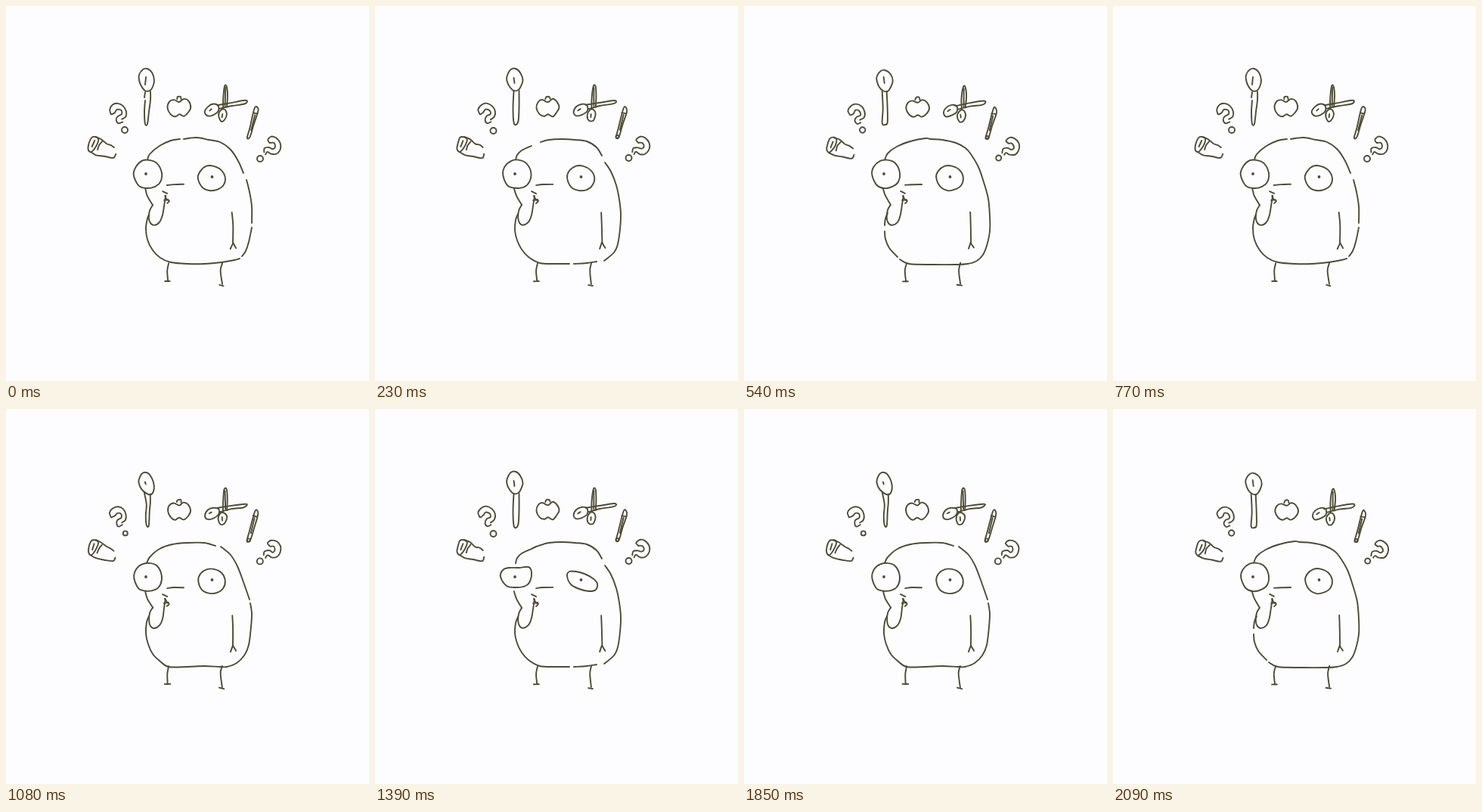
An HTML page with a canvas that plays this animation: 480x496 px, repeating every 2.17 s.

```html
<!DOCTYPE html>
<html lang="en">
<head>
<meta charset="utf-8">
<title>Thinking doodle</title>
<style>
html, body { margin: 0; width: 100%; height: 100%; overflow: hidden; background: #fdfdff; }
canvas { display: block; width: 480px; height: 496px; }
</style>
</head>
<body>
<canvas id="stage" width="480" height="496"></canvas>
<script>
const ctx = document.getElementById('stage').getContext('2d');
const PAPER = '#fdfdff', INK = '#4d4b33';
const LOOP = 2170, STEP = 77.2, LAST = 27;

// Strokes are split by "/"; a trailing "z" closes one.
const body = [
  `187,204 190,196 203,185 218,178 230,176 / 235,176 252,174 268,177 283,180 297,190 307,205 314,221
   / 318,230 322,246 325,265 325,287 / 325,293 321,312 317,324 312,331
   / 309,334 302,336 285,339 263,341 240,341 218,339 204,333 194,323 187,309 185,294 187,281 189,276`,
  `186,204 190,195 202,186 220,178 242,175 262,177 280,180 294,188 301,198 311,215 318,235 323,255 325,278
   324,298 321,316 315,328 306,337 294,340 270,341 240,341 218,340 204,333 193,321 187,308 185,295 187,281 190,274`,
  `186,204 190,195 202,186 220,179 240,175 247,176 262,177 280,181 293,188 300,196 310,213 317,233 323,255
   325,278 325,298 321,317 316,329 308,337 296,341 280,342 250,342 218,341 206,335
   / 203,332 192,320 187,308 186,298 / 186,290 187,281 190,274`,
  `186,204 188,197 194,191 207,185 / 219,180 230,177 247,176 264,177 280,179 293,187 300,198
   / 304,207 312,219 319,237 323,256 325,275 324,295 321,315 316,326 303,337 / 293,338 280,340 263,341
   / 257,341 240,341 218,340 203,332 194,322 188,310 185,297 186,283 189,275`,
  `186,204 190,196 203,185 220,179 240,177 262,177 277,181 / 284,182 297,193 306,208 314,229 322,252
   / 323,257 325,270 324,288 321,312 315,326 305,336 292,341 283,341 262,340 240,341 215,341 203,333 194,324
   188,311 185,297 186,282 189,274`
];

const spoon = [
  `176,91 181,84 187,83 193,88 196,98 194,107 190,112 184,112 179,106 176,98 z / 185,94 184,104
   / 184,114 183,121 / 184,125 183,140 184,156 187,156 189,140 191,124 191,113`,
  `175,92 180,85 187,84 193,89 196,99 193,108 189,112 183,112 178,106 175,98 z / 185,95 184,102
   / 183,113 183,140 184,155 187,157 189,145 190,113`,
  `175,92 180,85 186,84 193,89 196,98 193,107 189,112 183,111 178,106 175,98 z / 184,93 185,101
   / 182,112 183,135 182,154 186,156 189,153 189,135 188,112`,
  `175,93 180,84 187,83 193,89 196,98 193,107 190,111 184,112 178,106 175,99 z / 184,95 185,102
   / 184,112 183,135 184,154 187,157 190,152 191,135 191,112`,
  `176,93 180,85 187,84 193,91 196,101 195,109 191,113 184,110 179,105 176,98 z / 184,96 185,99
   / 183,110 186,126 185,140 186,153 189,154 190,135 191,124 191,112`
];

// Dots of the two question marks: x, y, radius per pose.
const dotA = [[157, 164, 4], [157, 164, 3.7], [156, 163, 3.7], [157, 165, 4], [158, 164, 3]];
const dotB = [[336, 202, 4], [336, 201, 4], [336, 200, 3.5], [336, 201, 4], [336, 201, 4]];

const shift = [[0, 0], [.3, .4], [.7, 1], [-.5, 0], [-.2, .4]];

const cup = `118,173 113,174 110,181 109,189 112,193 116,190 120,183 122,176 z
  / 119,173 126,176 133,182 139,184 143,187 / 112,193 119,197 130,199 142,201 145,196
  / 127,179 123,184 121,190 / 117,178 114,186`;
const apple = `229,127 222,124 216,127 214,135 218,143 224,146 229,143 235,146 241,141 244,134 241,126 235,123 z
  / 226,123 227,120 231,120 232,123`;
const scissors = `263,140 267,133 274,130 281,132 281,139 274,144 266,145 z / 269,138 272,136
  / 279,131 296,128 316,125 319,127 314,130 298,132 283,136
  / 287,136 287,122 289,106 292,106 293,118 292,134 / 290,108 290,132
  / 281,145 284,138 289,137 292,143 289,151 284,152 z / 286,143 286,147`;
const pencil = `329,135 333,135 333,141 328,157 323,173 319,174 322,161 z / 327,141 332,142 / 329,144 324,164`;
const hookA = `139,143 137,137 141,131 148,129 155,132 159,139 158,146 153,150
  / 154,153 149,155 146,151 148,146 153,143 152,138 147,137 144,141 140,143`;
const hookB = `349,181 346,177 351,173 358,175 363,181 363,189 358,195 351,196 346,193 343,196
  / 341,193 342,188 348,187 353,189 356,186 354,181 350,181`;

const face = `213,237 222,236 235,236 / 184,241 187,251 194,263
  / 194,263 190,270 189,280 191,287 196,290 203,286 207,277 209,263 211,251
  / 207,245 213,248 / 210,251 213,256 216,258 213,261 / 209,257 215,256`;
const limbs = `299,273 300,290 300,314 / 300,313 297,321 / 300,313 304,320
  / 215,340 213,350 214,364 / 210,364 217,364
  / 286,340 284,350 286,368 / 282,369 288,370`;

const wideL = `169,223 172,212 180,205 190,204 200,208 206,220 204,232 197,239 186,241 175,237 z`;
const wideR = `254,227 257,218 265,212 275,212 285,217 290,227 287,237 279,243 269,244 259,239 z`;
const squintL = `166,222 169,213 177,210 190,210 203,209 207,216 205,228 199,234 187,236 174,234 z`;
const squintR = `254,221 257,215 266,215 277,218 288,224 294,231 292,239 283,241 270,238 259,232 z`;

function noise(n) {
  const v = Math.sin(n * 127.1 + 3.7) * 43758.5453;
  return v - Math.floor(v) - .5;
}

// Smooth curve through the points.
function trace(pts, closed) {
  const n = pts.length;
  const at = i => closed ? pts[(i + n) % n] : pts[Math.max(0, Math.min(n - 1, i))];
  ctx.beginPath();
  ctx.moveTo(...pts[0]);
  for (let i = 0; i < (closed ? n : n - 1); i++) {
    const [a, b, c, d] = [at(i - 1), at(i), at(i + 1), at(i + 2)];
    ctx.bezierCurveTo(
      b[0] + (c[0] - a[0]) / 6, b[1] + (c[1] - a[1]) / 6,
      c[0] - (d[0] - b[0]) / 6, c[1] - (d[1] - b[1]) / 6, c[0], c[1]);
  }
  if (closed) ctx.closePath();
}

function sketch(text, pose, wobble = 0, fill = false) {
  text.split('/').forEach((part, s) => {
    const closed = part.includes('z');
    const pts = part.match(/\d+,\d+/g).map((p, i) => {
      const seed = pose * 97 + s * 31 + i * 2;
      return p.split(',').map((v, k) => +v + noise(seed + k) * wobble);
    });
    trace(pts, closed);
    if (fill) ctx.fill();
    ctx.stroke();
  });
}

function ring([x, y, r]) {
  ctx.beginPath();
  ctx.arc(x, y, r, 0, 7);
  ctx.stroke();
}

function pupil(x, y) {
  ctx.fillStyle = INK;
  ctx.beginPath();
  ctx.arc(x, y, 1.9, 0, 7);
  ctx.fill();
}

function draw(step) {
  const pose = step % 5;
  const squint = step >= 17 && step <= 19;
  ctx.fillStyle = PAPER;
  ctx.fillRect(0, 0, 480, 496);
  ctx.strokeStyle = INK;
  ctx.lineWidth = 1.9;
  ctx.lineCap = ctx.lineJoin = 'round';

  sketch(body[pose], pose);
  if (pose === 3 && step > 5) sketch('207,185 213,182 219,180', pose);
  sketch(face, pose, .6);
  sketch(limbs, pose, .9);

  ctx.fillStyle = PAPER;
  sketch(squint ? squintL : wideL, pose, squint ? 0 : .8, true);
  sketch(squint ? squintR : wideR, pose, squint ? 0 : .8, true);
  pupil(185, 222);
  pupil(272.5, 226);

  ctx.save();
  ctx.translate(...shift[pose]);
  [cup, apple, scissors, pencil, hookA, hookB].forEach(s => sketch(s, pose, .9));
  sketch(spoon[pose], pose);
  ring(dotA[pose]);
  ring(dotB[pose]);
  if (pose) ring([321, 173, 2]);
  ctx.restore();
}

function tick() {
  const t = performance.now() % LOOP;
  draw(Math.min(LAST, Math.floor((t + 3) / STEP)));
  requestAnimationFrame(tick);
}
tick();
</script>
</body>
</html>
```
